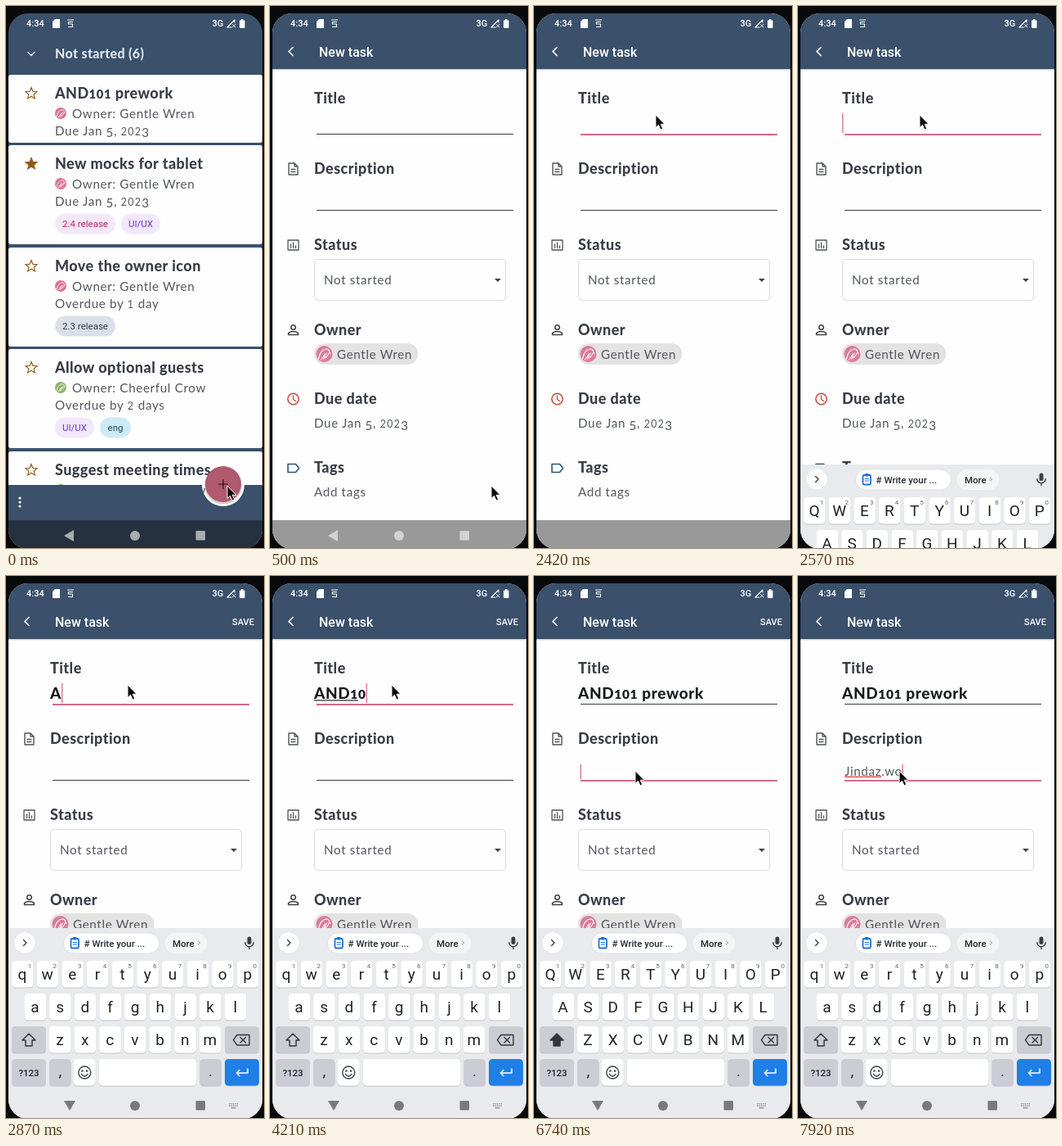
Recreate the animation shown at these times as an HTML page. Size 316 px wide and 662 px high, loop 8 s.

```html
<!DOCTYPE html>
<html lang="en">
<head>
<meta charset="utf-8">
<title>Task entry</title>
<style>
html, body { margin: 0; width: 100%; height: 100%; overflow: hidden; background: #08090b; }
svg { display: block; width: 100%; height: 100%; }
text { white-space: pre; font-family: Roboto, sans-serif; }
.h, .h2, .b, .field { font-family: Lato, sans-serif; }
.h { font-size: 18px; font-weight: 800; letter-spacing: .45px; fill: #383d47; }
.h2 { font-size: 16px; font-weight: 800; letter-spacing: .35px; fill: #dfe8f3; }
.b { font-size: 15.2px; letter-spacing: .65px; fill: #53575e; }
.field { font-size: 19px; font-weight: 800; letter-spacing: .6px; fill: #191b1f; }
.sm { font-size: .82em; letter-spacing: 1.3px; }
.h .sm, .field .sm { font-weight: 900; letter-spacing: .6px; }
.bar { font-size: 16px; font-weight: 500; fill: #fff; }
.st { font-size: 11px; font-weight: 500; fill: #fff; }
.chip { font-size: 11.5px; text-anchor: middle; }
.sug { font-size: 11.5px; font-weight: 500; fill: #25282c; }
.key { font-size: 19px; text-anchor: middle; fill: #202124; }
.num { font-size: 8px; text-anchor: middle; fill: #5f6368; }
.caps .key { text-transform: uppercase; }
.caps .shift { fill: #33373c; }
.line { fill: none; stroke-linecap: round; stroke-linejoin: round; }
</style>
</head>
<body>
<svg id="stage" viewBox="0 0 316 662"></svg>
<script>
const NAVY = '#3a506b', PINK = '#d5698f', INK = '#3c4045';
const OWNER = 'Gentle Wren', OTHER = 'Cheerful Crow';

// Old-style figures: 0-2 at x-height, 3 4 5 7 9 below the baseline.
function figures(s) {
  let low = 0;
  return s.split(/([0-2]+|[34579]+)/).filter(Boolean).map(p => {
    const down = +/[34579]/.test(p), dy = (down - low) * 2.5;
    low = down;
    return `<tspan class="${/[0-2]/.test(p) ? 'sm' : ''}" dy="${dy}">${p}</tspan>`;
  }).join('');
}
const plain = (x, y, cls, s, more = '') => `<text x="${x}" y="${y}" class="${cls}" ${more}>${s}</text>`;
const text = (x, y, cls, s) => plain(x, y, cls, figures(s));
const rect = (x, y, w, h, fill, r = 0, more = '') =>
  `<rect x="${x}" y="${y}" width="${w}" height="${h}" rx="${r}" fill="${fill}" ${more}/>`;
const circle = (x, y, r, fill, more = '') => `<circle cx="${x}" cy="${y}" r="${r}" fill="${fill}" ${more}/>`;
const line = (d, color, w = 1.5) => `<path class="line" d="${d}" stroke="${color}" stroke-width="${w}"/>`;
const shape = (d, fill) => `<path d="${d}" fill="${fill}"/>`;
const group = (id, body) => `<g id="${id}">${body}</g>`;

function avatar(x, y, r, color) {
  return `<g transform="translate(${x} ${y}) scale(${r / 10})">` + circle(0, 0, 10, color) +
    line('M-7 6C-6-1-2-6 3-6Q6-6 6-3L7.5-1 5.5-1C5 2 3 4 0 5M-4 7 1 0M-1 6 3-1', '#fff', 1.1) + '</g>';
}

function star(x, y, full) {
  const pts = [...Array(10).keys()].map(i => {
    const a = i * Math.PI / 5 - Math.PI / 2, r = i % 2 ? 3.3 : 7.4;
    return (x + r * Math.cos(a)).toFixed(2) + ',' + (y + r * Math.sin(a)).toFixed(2);
  });
  return `<polygon points="${pts.join(' ')}" fill="${full ? '#8c5a1d' : 'none'}" stroke="#966420" stroke-width="1.2"/>`;
}

const TAGS = {
  '2.4 release': ['#f4e7f8', '#bd2a68', 74], '2.3 release': ['#dbe0e8', '#343b45', 74],
  'UI/UX': ['#f2e7fb', '#6838cc', 48], 'eng': ['#cdebf5', '#1d4a5c', 38]
};

function card(y, h, title, owner, due, tags = [], full = false) {
  let x = 60;
  const chips = tags.map(name => {
    const [bg, fg, w] = TAGS[name], left = x;
    x += w + 7;
    return rect(left, y + 83.5, w, 25, bg, 12.5) + plain(left + w / 2, y + 100, 'chip', name, `fill="${fg}"`);
  }).join('');
  return rect(3, y, 311, h, '#fefefe', 3) + star(31, y + 23, full) + text(60, y + 29, 'h', title) +
    avatar(67, y + 47, 7, owner === OWNER ? '#de7391' : '#8db56b') +
    text(81, y + 52.5, 'b', 'Owner: ' + owner) + text(60, y + 73.5, 'b', due) + chips;
}

function navIcons(fill, down) {
  return shape(down ? 'M71 641H85L78 653Z' : 'M83 640V654L71 647Z', fill) +
    circle(158, 647, 6, fill) + rect(232.5, 641, 11.5, 11.5, fill, 1);
}

function statusBar() {
  return plain(25, 25, 'st', '4:34') + plain(252.5, 25, 'st', '3G') +
    shape('M60 16H66V27H57V19Z', '#fff') +
    line('M75.5 17H82.5M81.5 19.5H76.5V22H81.5V25.5H76.5', '#fff', 1.2) +
    line('M271 26 280 17V20M271 26H276', '#fff', 1.2) + line('M277.5 22.5 281 26M281 22.5 277.5 26', '#fff', 1) +
    rect(286, 17.5, 6.5, 9.5, '#fff', 1) + rect(288, 16, 2.5, 2, '#fff');
}

function listScreen() {
  return rect(3, 9, 311, 653, NAVY) + line('M27 56.5 31 60.5 35 56.5', '#e6edf5', 1.6) +
    text(60, 64, 'h2', 'Not started (6)') +
    card(84, 83, 'AND101 prework', OWNER, 'Due Jan 5, 2023') +
    card(170, 121, 'New mocks for tablet', OWNER, 'Due Jan 5, 2023', ['2.4 release', 'UI/UX'], true) +
    card(295, 121, 'Move the owner icon', OWNER, 'Overdue by 1 day', ['2.3 release']) +
    card(419, 121, 'Allow optional guests', OTHER, 'Overdue by 2 days', ['UI/UX', 'eng']) +
    card(544, 118, 'Suggest meeting times', OTHER, '') +
    shape('M3 585H240A26 26 0 0 0 292 585H314V662H3Z', NAVY) +
    circle(266, 585.5, 23, '#000', 'opacity=".18"') + circle(266, 584, 22, '#b0596f') +
    line('M260.5 584H271.5M266 578.5V589.5', '#1c1417', 1.2) +
    [601, 606, 611].map(y => circle(17, y, 1.6, '#fff')).join('') +
    rect(3, 628, 311, 34, '#26313f') + navIcons('#a7acb3');
}

function formScreen() {
  return rect(3, 9, 311, 653, '#fefefe') + rect(3, 77, 311, 1.5, '#d9dce0') + rect(3, 9, 311, 68, NAVY) +
    line('M28 50.5 23 55.5 28 60.5', '#fff', 1.7) + plain(60, 61.5, 'bar', 'New task') +
    plain(277, 59.5, 'st', 'SAVE', 'id="save"') +
    text(54, 119, 'h', 'Title') + text(54, 205, 'h', 'Description') + text(54, 298, 'h', 'Status') +
    text(54, 402, 'h', 'Owner') + text(54, 486, 'h', 'Due date') + text(54, 570, 'h', 'Tags') +
    line('M23 192H30L34 196V206H23ZM30 192V196H34M26 199.5H31M26 202.5H31', '#50545a', 1.4) +
    line('M22 286H35V298H22ZM25.5 291V295.5M28.5 289V295.5M31.5 293V295.5', '#50545a', 1.3) +
    circle(28.5, 392.5, 2.8, 'none', `stroke="${INK}" stroke-width="1.5"`) +
    line('M22.5 401.5V400Q24 397.5 28.5 397.5T34.5 400V401.5Z', INK, 1.5) +
    circle(28.5, 480, 6.7, 'none', 'stroke="#c9473d" stroke-width="1.5"') + line('M28.5 476V480.5L31.5 482.5', '#c9473d', 1.3) +
    line('M22 559.5H31.5L35.5 564.5 31.5 569.5H22Z', '#275374', 1.6) +
    rect(54.5, 309.5, 234, 50, '#fefefe', 4, 'stroke="#dadbdd"') + text(66, 340, 'b', 'Not started') +
    shape('M275 333H283L279 337Z', INK) +
    rect(54, 412, 127.5, 26, '#e3e3e3', 13) + avatar(66.5, 425, 10, '#dd7b98') + text(82, 430.5, 'b', OWNER) +
    text(54, 515, 'b', 'Due Jan 5, 2023') + text(54, 599, 'b', 'Add tags') +
    '<rect id="rule0" x="57"/><rect id="rule1" x="57"/>' +
    '<text id="entry0" class="field" x="54" y="149.5"/><text id="entry1" class="b" x="57" y="244"/>' +
    '<rect id="under0" x="54" y="151.3" height="1.2" fill="#24262a"/><rect id="under1" x="57" y="244.6" height="1.5"/>' +
    '<rect id="caret" width="1.5" fill="#e07b9c"/>' +
    rect(3, 628, 311, 34, '#999') + group('formNav', navIcons('#d3d3d3'));
}

function keyRow(letters, x0, y, digits = '') {
  return [...letters].map((c, i) => {
    const x = x0 + i * 30.65;
    return key(x - 13, y, 26.5, '#fff') + plain(x, y + 22.5, 'key', c) +
      (digits ? plain(x + 9, y + 8.5, 'num', digits[i]) : '');
  }).join('');
}
function key(x, y, w, fill) {
  return rect(x, y + 1, w, 32.5, '#c3c6cb', 4.5) + rect(x, y, w, 32.5, fill, 4.5);
}

function keyboard() {
  const gray = '#cacdd4';
  return rect(3, 430, 311, 362, '#e8eaed') +
    circle(23, 448, 12.5, '#fff') + line('M21.5 444.5 25 448 21.5 451.5', '#44474b') +
    rect(70.5, 436, 117, 25, '#fff', 12.5, 'stroke="#d9dbdf" stroke-width=".8"') +
    rect(79.5, 443, 9.5, 11.5, '#fff', 1.5, 'stroke="#1a73d9" stroke-width="1.8"') +
    rect(82, 441, 4.5, 3.5, '#1a73d9', 1) + line('M82 447.5H86.5M82 450H86.5', '#1a73d9', 1) +
    plain(95.5, 452.5, 'sug', '# Write your ...') +
    rect(194.5, 436, 52, 25, '#f4f5f6', 12.5) + plain(204, 452.5, 'sug', 'More') +
    line('M235.5 446 237.5 448 235.5 450', '#b4b7bb', 1.2) +
    rect(295.5, 440.5, 5, 9.5, '#3c4043', 2.5) + line('M292.8 447.5A5.2 5.2 0 0 0 303.2 447.5M298 453V455.5', '#3c4043', 1.4) +
    keyRow('qwertyuiop', 20, 470, '1234567890') + keyRow('asdfghjkl', 35.5, 510) + keyRow('zxcvbnm', 66, 550) +
    key(7, 550, 42, gray) + '<path class="shift line" d="M28 559 36 567H32V574H24V567H20Z" stroke="#33373c" stroke-width="1.5"/>' +
    key(268, 550, 42, gray) + line('M283 560.5H298V573H283L278.5 566.7ZM287 563.5 293.5 570M293.5 563.5 287 570', '#33373c', 1.4) +
    key(7, 590, 42, gray) + plain(28, 611, 'sug', '?123', 'text-anchor="middle"') +
    key(53, 590, 26.5, gray) + plain(66.3, 611, 'key', ',') +
    key(83, 590, 26.5, '#fff') + circle(96.3, 606.5, 7.5, 'none', `stroke="${INK}" stroke-width="1.4"`) +
    circle(93.5, 604.5, 1.2, INK) + circle(99, 604.5, 1.2, INK) + line('M92.5 608.5Q96.3 613.5 100 608.5', INK, 1.3) +
    key(114, 590, 119, '#fff') + key(237.5, 590, 26.5, gray) + plain(250.5, 611, 'key', '.') +
    key(268, 590, 42, '#1f7fe6') + line('M296 602V607H282.5M286 603.5 282.5 607 286 610.5', '#fff', 1.6) +
    navIcons('#77797d', true) +
    [0, 1, 2, 3, 4].map(i => rect(273 + i * 2.4, 644, 1.4, 1.4, '#8b8e92') + rect(273 + i * 2.4, 646.5, 1.4, 1.4, '#8b8e92')).join('') +
    rect(275.5, 649, 6, 1.3, '#8b8e92');
}

document.getElementById('stage').innerHTML =
  '<clipPath id="glass"><rect x="3" y="9" width="311" height="654" rx="24"/></clipPath>' +
  '<g clip-path="url(#glass)">' + group('list', listScreen()) + group('form', formScreen()) +
  group('keys', keyboard()) + statusBar() + '</g>' +
  '<path id="pointer" d="M0 0V15.5L3.5 12.3 6 18 8.7 16.8 6.2 11.3H11Z" fill="#0a0a0a" stroke="#fff" stroke-width="1"/>';

const $ = id => document.getElementById(id);
const at = (rows, t) => rows.filter(r => r[0] <= t).pop();
const show = (id, on) => $(id).setAttribute('visibility', on ? 'visible' : 'hidden');
const set = (id, attrs) => { for (const k in attrs) $(id).setAttribute(k, attrs[k]); };

const LOOP = 8000;
const POINTER = [[0, 271, 586], [940, 252, 520], [1090, 205, 330], [1240, 160, 170], [1390, 149, 133],
  [6150, 146, 150], [6300, 133, 205], [6440, 124, 238]];
// Each row: time, typed text, first and last underlined character
const ENTRY = [
  [[0, '', 0, 0], [2870, 'A', 0, 0], [3310, 'AN', 0, 0], [3460, 'AN', 0, 1], [3610, 'AND', 0, 2], [3910, 'AND', 0, 3],
    [4210, 'AND10', 0, 4], [4500, 'AND101', 0, 5], [4800, 'AND101', 0, 0], [5100, 'AND101 p', 0, 0],
    [5250, 'AND101 pr', 7, 8], [5400, 'AND101 pre', 7, 9], [5700, 'AND101 prewo', 7, 11],
    [5850, 'AND101 prewor', 7, 12], [6000, 'AND101 prework', 7, 13], [6590, 'AND101 prework', 0, 0]],
  [[0, '', 0, 0], [7030, 'J', 0, 0], [7180, 'Ji', 0, 1], [7330, 'Jin', 0, 2], [7470, 'Jinda', 0, 4],
    [7620, 'Jindaz', 0, 5], [7920, 'Jindaz.wo', 0, 6]]
];
const shown = ['', ''];

function fill(i, t) {
  const [, s, from, to] = at(ENTRY[i], t), el = $('entry' + i);
  if (shown[i] !== s) {
    el.innerHTML = figures(s);
    shown[i] = s;
  }
  const width = n => n ? el.getSubStringLength(0, n) : 0;
  const left = i ? 57 : 54;
  set('under' + i, { x: left + width(from), width: width(to) - width(from) });
  return left + width(s.length);
}

function draw(t) {
  const onForm = t >= 500, focus = t < 1680 ? -1 : t < 6590 ? 0 : 1;
  show('list', !onForm);
  show('form', onForm);
  show('save', t >= 2870);
  show('keys', t >= 2570);
  set('keys', { transform: `translate(0 ${t < 2720 ? 130 : 0})` });
  $('keys').classList.toggle('caps', t < 2870 || (t >= 6590 && t < 7030));
  set('formNav', { opacity: t < 1980 ? 1 : t < 2120 ? .5 : 0 });

  const ends = [fill(0, t), fill(1, t)];
  set('under1', { fill: t < 7920 ? '#45484d' : '#d9534a' });
  [156, 249].forEach((y, i) => set('rule' + i, {
    y, width: 241, height: focus === i ? 2 : 1, fill: focus === i ? PINK : '#3b3d41'
  }));
  show('caret', focus >= 0 && !(t >= 1980 && t < 2570));
  set('caret', focus === 1 ? { x: ends[1] - .5, y: 230, height: 18 } : { x: ends[0], y: 131, height: 24 });

  const [, x, y] = at(POINTER, t);
  set('pointer', { transform: `translate(${x} ${y})` });
}

function tick() {
  draw(performance.now() % LOOP);
  requestAnimationFrame(tick);
}
tick();
</script>
</body>
</html>
```
